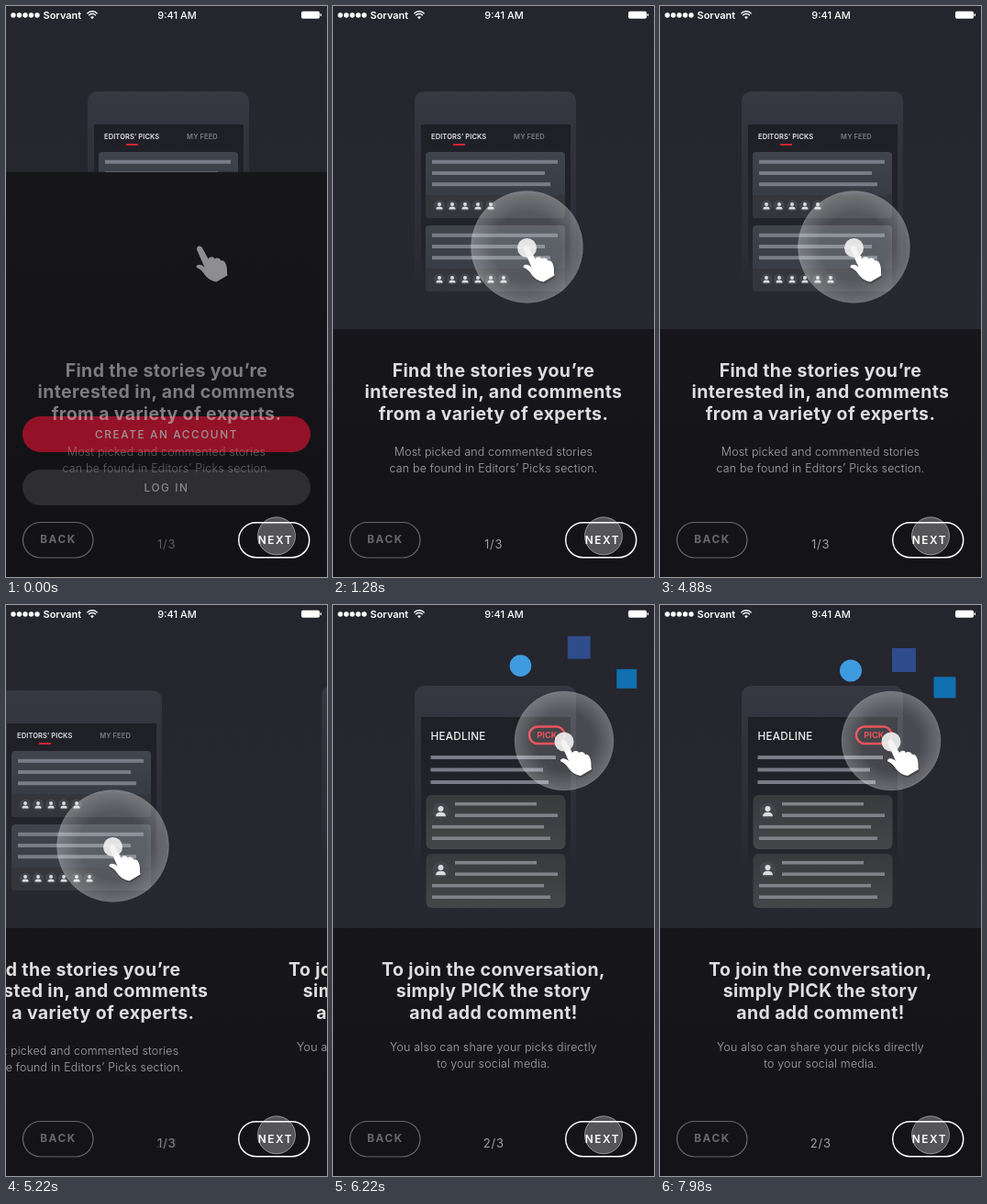
Animation of 350 by 622 pixels, one loop 8 s. Source, as an HTML page:

```html
<!DOCTYPE html>
<html lang="en">
<head>
<meta charset="utf-8">
<title>Onboarding</title>
<style>
  html, body { margin: 0; width: 100%; height: 100%; overflow: hidden; background: #131317; }
  svg { display: block; width: 100%; height: 100%; }
  text { font-family: Inter, Roboto, sans-serif; }
  .title { font-size: 19.5px; font-weight: 700; letter-spacing: .38px; fill: #dededf; }
  .sub { font-size: 12.4px; font-weight: 300; letter-spacing: .22px; fill: #a9a9ad; }
  .btn { font-size: 11.8px; font-weight: 500; letter-spacing: 1.6px; }
  .tab { font-size: 7.5px; font-weight: 600; letter-spacing: .1px; }
  .bar { font-size: 11px; fill: #fff; }
  .num { font-size: 13px; letter-spacing: .8px; fill: #a0a0a4; }
</style>
</head>
<body>
<svg id="stage" viewBox="0 0 350 622" xmlns="http://www.w3.org/2000/svg"></svg>
<script>
const LOOP = 8000;
const stage = document.getElementById('stage');

// Markup helpers
const rect = (x, y, w, h, fill, rx = 0, more = '') =>
  `<rect x="${x}" y="${y}" width="${w}" height="${h}" rx="${rx}" fill="${fill}" ${more}/>`;
const circle = (x, y, r, fill, more = '') =>
  `<circle cx="${x}" cy="${y}" r="${r}" fill="${fill}" ${more}/>`;
const label = (x, y, cls, str, more = 'text-anchor="middle"') =>
  `<text x="${x}" y="${y}" class="${cls}" ${more}>${str}</text>`;
const row = (x, right, y, fill, h = 4) => rect(x, y - h / 2, right - x, h, fill);
const gradient = (id, ...stops) =>
  `<linearGradient id="${id}" x1="0" y1="0" x2="0" y2="1">${stops.map(([at, color, alpha = 1]) =>
    `<stop offset="${at}" stop-color="${color}" stop-opacity="${alpha}"/>`).join('')}</linearGradient>`;

const person = (x, y, r) => `<g transform="translate(${x} ${y}) scale(${r / 6})">
  ${circle(0, 0, 6, '#45464b')}${circle(0, -1.5, 2, '#dcdcde')}
  <path d="M-3.6 3.9C-3.6 1.7-1.9 1 0 1S3.6 1.7 3.6 3.9Z" fill="#dcdcde"/></g>`;

const phone = (top, screen, bottom) =>
  `<path d="M89 ${bottom}V${top + 12}Q89 ${top} 101 ${top}H253Q265 ${top} 265 ${top + 12}V${bottom}Z" fill="url(#shell)"/>` +
  rect(96, screen, 163, 322 - screen, 'url(#screen)');

const storyCard = (y, people) =>
  rect(101, y, 152, 72, 'url(#story)', 4) +
  `<path d="M101 ${y + 47}h152v21q0 4-4 4h-144q-4 0-4-4z" fill="#34363c"/>` +
  [245, 231, 237].map((right, i) => row(108, right, y + 10.8 + i * 12.2, '#777d87')).join('') +
  Array.from({ length: people }, (_, i) => person(116 + i * 14, y + 58.5, 6)).join('');

const commentCard = y =>
  rect(101.5, y, 152, 59, 'url(#comment)', 6) + person(117.5, y + 17.3, 9) +
  [[133, 222], [133, 245], [108, 230], [108, 237]].map(([a, b], i) =>
    row(a, b, y + 9.7 + i * 12.5, '#81828a', 3.6)).join('');

const copy = (title, sub, subY) =>
  title.map((s, i) => label(175, 403.7 + i * 23.4, 'title', s)).join('') +
  sub.map((s, i) => label(175, subY + i * 18.5, 'sub', s)).join('');

const HAND = 'M-3 4C-5-1 1-3 3 2L9 13C11 10 15 10 16 13C18 11 22 12 23 15C26 14 28 17 29 21' +
  'C30 25 29 28 30 31L18 38C12 37 8 34 5 30C2 25-1 24-4 22C-4 19 0 18 5 22Z';
const hand = (n, x, y) => `<g id="hand${n}"><g transform="translate(${x} ${y})">
  <circle id="ripple${n}" fill="url(#glow)" stroke="#fff" stroke-opacity=".1"/>
  <path d="${HAND}" transform="translate(1 2)" opacity=".25"/>
  <path d="${HAND}" fill="#fff"/>
  <circle id="dot${n}" cy="1" r="10.5" fill="#f2f2f2" fill-opacity=".9"/></g></g>`;

const wifi = [2.6, 5, 7.4].map((r, i) => i
  ? `<path d="M${94 - r * .76} ${14 - r * .76}A${r} ${r} 0 0 1 ${94 + r * .76} ${14 - r * .76}" fill="none" stroke="#fff" stroke-width="1.5"/>`
  : `<path d="M94 14.2l-2-2.2q2-1.6 4 0z" fill="#fff"/>`).join('');

const statusBar = [8, 14.5, 21, 27.5, 34].map(x => circle(x, 10, 2.7, '#fff')).join('') +
  label(40.5, 13.8, 'bar', 'Sorvant', 'font-weight="600"') + wifi +
  label(186.5, 14, 'bar', '9:41 AM', 'text-anchor="middle" font-weight="500"') +
  rect(322, 5.8, 20, 8, '#fff', 1.8) + rect(342.6, 8.3, 1.4, 3, '#fff', .7);

stage.innerHTML = `<defs>
  ${gradient('top', [0, '#24252d'], [1, '#292a32'])}
  ${gradient('base', [0, '#17171b'], [.5, '#131317'], [1, '#121216'])}
  ${gradient('shell', [0, '#363842'], [.35, '#30313a'], [.8, '#2b2c35'], [1, '#292a32', 0])}
  ${gradient('screen', [0, '#1f2026'], [.7, '#24252c'], [1, '#292a32', 0])}
  ${gradient('story', [0, '#3f444d'], [1, '#343840'])}
  ${gradient('comment', [0, '#393a3e'], [1, '#45464a'])}
  <radialGradient id="glow"><stop offset="0" stop-color="#fff" stop-opacity=".16"/>
    <stop offset=".6" stop-color="#fff" stop-opacity=".17"/>
    <stop offset="1" stop-color="#fff" stop-opacity=".33"/></radialGradient>
</defs>
${rect(0, 0, 350, 622, 'url(#top)')}
<g id="phone1">${phone(93, 129, 316)}
  ${label(137.2, 145.2, 'tab', 'EDITORS’ PICKS', 'text-anchor="middle" fill="#e6e6e8"')}
  ${label(214, 145.2, 'tab', 'MY FEED', 'text-anchor="middle" fill="#7c7d83"')}
  ${rect(131, 150, 13, 2, '#d8232f')}
  ${storyCard(159, 5)}${storyCard(239, 6)}
</g>
<g id="phone2">${phone(88, 122, 292)}
  <text x="106.5" y="147" font-size="11.7" font-weight="500" letter-spacing=".25" fill="#f0f0f2">HEADLINE</text>
  <rect id="pick" x="214" y="132.5" width="38.5" height="18.5" rx="9.25" fill="#1e1f25" stroke="#e8303c"/>
  <text x="233.4" y="145.2" font-size="9.4" font-weight="700" text-anchor="middle" fill="#e8303c">PICK</text>
  ${row(106.5, 243, 166, '#797b85')}${row(106.5, 229, 179.5, '#797b85')}${row(106.5, 235, 193, '#797b85')}
  ${commentCard(207)}${commentCard(271)}
</g>
<g id="panel">${rect(0, 0, 350, 622, 'url(#base)')}</g>
<g id="login">
  ${rect(18, 447, 314, 39, '#c3122d', 19.5)}${rect(18, 505, 314, 39, '#38383c', 19.5)}
  ${label(175, 470.8, 'btn', 'CREATE AN ACCOUNT', 'text-anchor="middle" fill="#d0c0c4"')}
  ${label(175, 528.6, 'btn', 'LOG IN', 'text-anchor="middle" fill="#b4b4b8"')}
</g>
<g id="copy1">${copy(['Find the stories you’re', 'interested in, and comments', 'from a variety of experts.'],
  ['Most picked and commented stories', 'can be found in Editors’ Picks section.'], 489.5)}</g>
<g id="copy2">${copy(['To join the conversation,', 'simply PICK the story', 'and add comment!'],
  ['You also can share your picks directly', 'to your social media.'], 485.8)}</g>
<g id="count1">${label(175.2, 590.6, 'num', '1/3')}</g>
<g id="count2">${label(175.2, 590.6, 'num', '2/3')}</g>
${rect(18.5, 562.5, 76.5, 38.5, 'none', 19.25, 'stroke="#68686c" stroke-width="1.2"')}
${label(57, 585.3, 'btn', 'BACK', 'text-anchor="middle" fill="#68686c" style="font-weight:700"')}
${rect(253.7, 562.7, 77, 38, 'none', 19, 'stroke="#fff" stroke-width="1.5"')}
${label(293.9, 586, 'btn', 'NEXT', 'text-anchor="middle" fill="#fff" style="font-weight:600"')}
${circle(295, 577.3, 20.5, '#fff', 'fill-opacity=".28" stroke="#fff" stroke-opacity=".45"')}
${hand(1, 211.5, 262.5)}
<g id="icons">
  <circle r="12" fill="#3f9bdf"/>
  <rect x="-13" y="-13" width="26" height="26" fill="#2f4c8b"/>
  <rect x="-12" y="-11.5" width="24" height="23" fill="#1070b0"/>
</g>
${hand(2, 252, 148)}
${statusBar}`;

const el = Object.fromEntries([...stage.querySelectorAll('g[id], circle[id], rect[id]')].map(n => [n.id, n]));
const icons = [...el.icons.children];

// Where each icon lands, relative to the tap, and its slow drift afterwards
const FLIGHTS = [
  { x: -43, y: -74, dx: -1, dy: -2.5 },
  { x: 14, y: -88, dx: 0, dy: 0 },
  { x: 57.5, y: -57, dx: 1, dy: -1.2 }
];

const span = (t, from, to) => Math.min(1, Math.max(0, (t - from) / (to - from)));
const easeOut = p => 1 - (1 - p) ** 3;
const easeInOut = p => p < .5 ? 4 * p ** 3 : 1 - 4 * (1 - p) ** 3;
const backOut = (p, s) => 1 + (s + 1) * (p - 1) ** 3 + s * (p - 1) ** 2;

const fade = (node, alpha) => node.setAttribute('opacity', alpha);
const move = (node, x, y = 0) => node.setAttribute('transform', `translate(${x} ${y})`);

function ripple(n, radius, p) {
  el['ripple' + n].setAttribute('r', Math.max(0, radius * backOut(p, 1.4)));
  fade(el['ripple' + n], Math.min(1, p * 3));
}

function draw(t) {
  // Login screen gives way to the first page
  const enter = .51 + .49 * easeOut(span(t, 0, 420));
  move(el.panel, 0, 352 * enter);
  fade(el.login, Math.max(0, 1 - (enter - .51) / .49) * .74);
  fade(el.copy1, enter);
  fade(el.hand1, enter);
  fade(el.dot1, span(t, 600, 760));
  ripple(1, 61, span(t, 760, 1200));

  // First page slides out, second slides in
  const slide = 350 * easeInOut(span(t, 4960, 5600));
  for (const part of ['phone', 'copy', 'hand']) {
    move(el[part + 1], -slide);
    move(el[part + 2], 350 - slide);
  }
  const swap = span(t, 5180, 5380);
  fade(el.count1, enter * (1 - swap));
  fade(el.count2, swap);

  // Tap on the pick button
  const press = span(t, 5620, 5740) - span(t, 5800, 5960);
  el.pick.setAttribute('stroke-width', 2.4 + press);
  fade(el.dot2, span(t, 5620, 5740));
  ripple(2, 54, span(t, 5800, 6200));

  const drift = span(t, 6680, 7980);
  FLIGHTS.forEach((f, i) => {
    const p = span(t, 5820 + i * 50, 6360 + i * 50);
    const k = backOut(p, 2.5);
    const x = 252 + f.x * k + f.dx * drift, y = 148 + f.y * k + f.dy * drift;
    icons[i].setAttribute('transform', `translate(${x} ${y}) scale(${easeOut(p)})`);
    fade(icons[i], Math.min(1, p * 4));
  });
}

const start = performance.now();
function tick(now) {
  draw(Math.max(0, now - start) % LOOP);
  requestAnimationFrame(tick);
}
draw(0);
requestAnimationFrame(tick);
</script>
</body>
</html>
```
